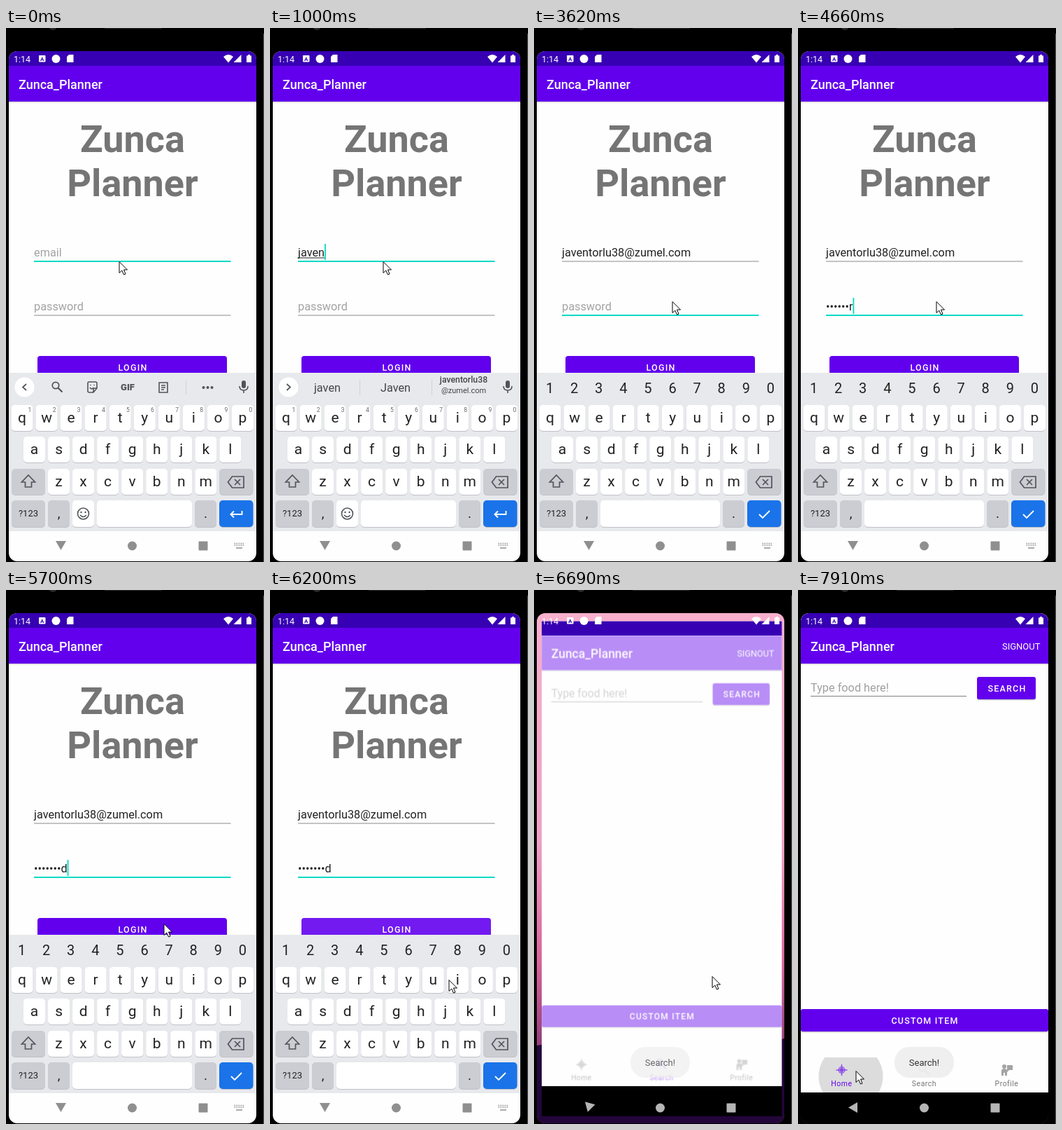
Animation of 369x762 px, one loop 8000 ms. Source, as an HTML page:

```html
<!DOCTYPE html>
<html lang="en">
<head>
<meta charset="utf-8">
<title>Login demo</title>
<style>
  html, body { margin: 0; width: 100%; height: 100%; overflow: hidden; background: #000; }
  svg { display: block; width: 369px; height: 762px; font-family: Roboto, sans-serif; white-space: pre; }
</style>
</head>
<body>
<svg viewBox="0 0 369 762"></svg>
<script>
const LOOP = 8000;
const PURPLE = '#6200ee', DARK_PURPLE = '#3700b3', TEAL = '#03dac5', INK = '#222', ICON = '#50545a';
const APP = ['Zunca', 'Planner'], NAME = 'javen', USER = 'javentorlu38', DOMAIN = '@zumel.com';
const PASSWORD = 'backyard', FIELD_SIZE = 16.3;

const svg = document.querySelector('svg');
const measure = document.createElement('canvas').getContext('2d');
const textWidth = s => {
  measure.font = `${FIELD_SIZE}px Roboto, sans-serif`;
  return measure.measureText(s).width;
};

// Drawing helpers, each returning SVG markup
const rect = (x, y, w, h, fill, r = 0, more = '') =>
  `<rect x="${x}" y="${y}" width="${w}" height="${h}" rx="${r}" fill="${fill}" ${more}/>`;
const circle = (x, y, r, fill, more = '') => `<circle cx="${x}" cy="${y}" r="${r}" fill="${fill}" ${more}/>`;
const fillPath = (d, fill, more = '') => `<path d="${d}" fill="${fill}" ${more}/>`;
const line = (d, color = ICON, width = 1.7, more = '') =>
  `<path d="${d}" fill="none" stroke="${color}" stroke-width="${width}" ${more}/>`;
const text = (x, y, size, s, fill = INK, anchor = 'middle', weight = 400, more = '') =>
  `<text x="${x}" y="${y}" font-size="${size}" fill="${fill}" text-anchor="${anchor}" font-weight="${weight}" ${more}>${s}</text>`;
const group = (more, body) => `<g ${more}>${body}</g>`;
const place = (x, y, scale) => `transform="translate(${x} ${y}) scale(${scale})"`;
const label = (x, y, s) => text(x, y, 12.5, s, '#fff', 'middle', 500, 'letter-spacing="1.2"');
const magnifier = (x, y, color) =>
  circle(x - 2, y - 2, 4.7, 'none', `stroke="${color}" stroke-width="1.8"`) + line(`M${x + 1.5} ${y + 1.5}l6 6`, color, 2.2);

// Value of the latest step [time, ...values] that has started
const stepAt = (steps, t) => steps.filter(s => s[0] <= t).pop().slice(1);

const POINTER = [[0, 162, 333], [1560, 182, 303], [1690, 226, 370], [1810, 270, 455], [1930, 297, 529],
  [2200, 293, 526], [2350, 288, 518], [2590, 262, 470], [2710, 224, 418], [2850, 200, 393], [2970, 198, 390],
  [5310, 224, 450], [5460, 230, 470], [5700, 226, 476], [5960, 229, 482], [6080, 246, 525], [6200, 256, 556],
  [6570, 256, 554], [6690, 255, 551], [6840, 248, 540], [6960, 230, 515], [7100, 206, 465], [7250, 178, 409],
  [7370, 130, 480], [7490, 92, 620], [7610, 83, 686]];
const NAME_TYPED = [[0, 0], [150, 1], [520, 2], [640, 3], [880, 4], [1000, 5]];
const PASSWORD_TYPED = [[0, 0], [3740, 1], [3860, 2], [4120, 3], [4270, 4], [4390, 5], [4510, 6], [4660, 7], [4780, 8]];
const CARET = [[0, 0], [150, 1], [1560, 0], [2080, 1], [3620, 0], [3740, 1], [5310, 0], [5700, 1], [6200, 0]];
const RIPPLE = [[0, 0, 0], [5820, 70, .22], [5960, 170, .22], [6080, 280, .2], [6200, 280, .1]];
// x, y, scale of the entering card, opacity of its content and of the toast, turn of the back key
const ENTER = [[0, 0, 0, 1, 0, 0, 0], [6450, 141, 13, .963, 0, 0, 0], [6570, 38, 13, .965, .12, .3, 3],
  [6690, 7.2, 12.6, .97, .446, .75, 15], [6840, 1.2, 2.5, .994, .85, 1, 65], [6960, 0, 0, 1, 1, 1, 90]];

const appHeader = () => rect(4, 54, 354, 51, PURPLE) + rect(4, 105, 354, 1.5, '#000', 0, 'opacity=".15"')
  + text(18, 87, 18, APP.join('_'), '#fff', 'start', 500);

function field(y, content, hint, focused, caret, underline) {
  const shown = content || hint;
  let out = text(40, y - 7, FIELD_SIZE, shown, content ? INK : '#a3a3a3', 'start');
  out += focused ? rect(40, y - 1, 281.5, 2, TEAL) : rect(40, y - .5, 281.5, 1, '#8c8c8c');
  const end = 40 + textWidth(content);
  if (underline) out += rect(40, y - 5.5, end - 40, 1, INK);
  if (caret) out += rect(end, y - 25, 1.8, 23, TEAL);
  return out;
}

function key(x, y, w, glyph = '', fill = '#fff', size = 21, h = 37) {
  return rect(x, y + 1, w, h, '#bfc1c6', 5) + rect(x, y, w, h, fill, 5)
    + text(x + w / 2, y + h / 2 + size * .33, size, glyph);
}

function tools() {
  return circle(26.5, 512.5, 14, '#fff') + line('M29 508l-5 4.500 5 4.500') + magnifier(73, 512, ICON)
    + line('M117 507q0-2 2-2h9q2 0 2 2v7l-5 6h-6q-2 0-2-2zM130 514h-5v6M120 513q3 4 5 0M121 509v1M126 509v1', ICON, 1.6)
    + text(174, 517, 13, 'GIF', ICON, 'middle', 900)
    + line('M219 506h12v14h-12zM222 506h6M222 510h6M222 513h6M222 516h4', ICON, 1.6)
    + rect(257, 503, 1, 20, '#cfd1d5') + [282.5, 288.5, 294.5].map(x => circle(x, 513, 2, ICON)).join('');
}

function suggestions(typed) {
  return circle(26.5, 512.5, 14, '#fff') + line('M24 508l5 4.500-5 4.500')
    + text(82, 519, FIELD_SIZE, typed, '#444') + text(179.5, 519, FIELD_SIZE, typed[0].toUpperCase() + typed.slice(1), '#444')
    + rect(128, 502, 1, 22, '#cfd1d5') + rect(231, 502, 1, 22, '#cfd1d5')
    + text(277, 506, 12.3, USER, '#444', 'middle', 500) + text(277, 521, 11, DOMAIN, '#444');
}

function keyboard(secret, strip) {
  const gray = '#cbcdd3';
  const row = (letters, x, y) => [...letters].map((c, i) => key(x + i * 35.05, y, 31, c)).join('');
  const digits = [...'1234567890'].map((d, i) => secret
    ? text(22.5 + i * 35.1, 521, 20, d) : text(34 + i * 35.1, 548, 8.5, d, '#666')).join('');
  const mic = rect(337, 503, 6, 11, ICON, 3) + line('M334 511q0 6 6 6t6-6M340 517v4', ICON, 1.6);
  const emoji = circle(110.500, 693, 8, 'none', `stroke="${ICON}" stroke-width="1.600"`)
    + circle(107.500, 691, 1.2, ICON) + circle(113.500, 691, 1.2, ICON) + line('M106 695q4.500 5 9 0', ICON, 1.5);
  return rect(4, 492, 354, 226, '#e8e9ed') + (secret ? '' : strip + mic)
    + row('qwertyuiop', 7.5, 538) + digits + row('asdfghjkl', 25, 583) + row('zxcvbnm', 60, 629)
    + key(8, 629, 48, '', gray) + line('M32 638l9.500 10h-5v7h-9v-7h-5z')
    + key(305, 629, 48.5, '', gray) + line('M317.500 648l6-8h16.500v16h-16.500zM327 644l8 8M335 644l-8 8')
    + key(8, 674, 48, '?123', gray, 13, 38) + key(60, 674, 31, ',', gray, 19, 38)
    + (secret ? key(95, 674, 171, '', '#fff', 9, 38) : key(95, 674, 31, '', '#fff', 9, 38) + emoji + key(130, 674, 136, '', '#fff', 9, 38))
    + key(270, 674, 31, '.', gray, 19, 38) + key(305, 674, 48.5, '', '#1a73e8', 9, 38)
    + line(secret ? 'M322 694l5 5 10-10' : 'M337.500 689v5h-16M326 689.500l-4.500 4.500 4.500 4.500', '#fff', 1.9);
}

function loginScreen(t) {
  const [letters] = stepAt(NAME_TYPED, t), [secretLetters] = stepAt(PASSWORD_TYPED, t);
  const [caret] = stepAt(CARET, t), [radius, glow] = stepAt(RIPPLE, t);
  const filled = t >= 2470, secret = t >= 2970;
  const typed = NAME.slice(0, letters);
  const masked = secretLetters ? '•'.repeat(secretLetters - 1) + PASSWORD[secretLetters - 1] : '';
  return rect(4, 33, 354, 728, '#fefefe') + rect(4, 33, 354, 21, DARK_PURPLE) + appHeader()
    + APP.map((word, i) => text(181, 177 + i * 63, 54, word, '#757575', 'middle', 700)).join('')
    + field(333, filled ? USER + DOMAIN : typed, 'email', !secret, caret && !secret, typed && !filled)
    + field(410, masked, 'password', secret, caret && secret)
    + rect(45, 468, 271, 33, PURPLE, 4)
    + group('clip-path="url(#loginClip)"', circle(229, 484, radius, '#fff', `opacity="${glow}"`))
    + label(181.5, 489, 'LOGIN')
    + keyboard(secret, t >= 400 && !filled ? suggestions(typed) : tools());
}

function tabs(homeSelected) {
  const color = on => on ? PURPLE : '#757575';
  const name = (x, s, on) => text(x, 708, 10.5, s, color(on), 'middle', 400, 'letter-spacing=".5"');
  const home = color(homeSelected);
  return (homeSelected ? group('clip-path="url(#tabClip)"', circle(75.5, 694, 46, '#dcdcdc')) : '')
    + group('opacity=".65"',
      circle(62.5, 685, 5, home) + circle(62.5, 685, 3.5, 'none', 'stroke="#ddd" stroke-width=".8"')
      + line('M62.500 677v16M54.500 685h16', home, 1.5)
      + magnifier(180, 684, color(!homeSelected))
      + circle(295, 680, 3, '#757575') + fillPath('M291 693v-7q0-3 4-3t4 3v7h-3v-4h-2v4zM299 678h8v7h-5l-3 3z', '#757575'))
    + name(62.5, 'Home', homeSelected) + name(180.5, 'Search', !homeSelected) + name(298.5, 'Profile', false);
}

function homeScreen(t, opacity) {
  const raised = (x, y, w, h) => rect(x, y + 1.5, w, h, '#000', 3, 'opacity=".2"') + rect(x, y, w, h, PURPLE, 3);
  return rect(4, 33, 354, 684, '#fefefe') + rect(4, 33, 354, 21, DARK_PURPLE) + rect(4, 717, 354, 44, '#000')
    + group(`opacity="${opacity}"`, appHeader() + text(346.5, 85, 13, 'SIGNOUT', '#fff', 'end')
      + text(18, 145, FIELD_SIZE, 'Type food here!', '#a0a0a0', 'start') + rect(18, 151, 223, 1, '#808080')
      + raised(256, 124, 84, 32) + label(299, 145, 'SEARCH')
      + raised(4, 598, 354, 32) + label(181.5, 619, 'CUSTOM ITEM') + tabs(t >= 7910));
}

const wallpaper = () => rect(4, 33, 354, 728, 'url(#sky)')
  + fillPath('M4 650L60 640 128 632 145 638 250 660 358 640V761H4z', '#22063a');

const statusIcons = () => text(11, 48.5, 12.5, '1:14', '#fff', 'start')
  + rect(47, 39, 9.5, 9.5, '#fff', 1) + text(51.8, 46.8, 8, 'A', DARK_PURPLE, 'middle', 700)
  + circle(71.5, 44, 6, '#fff') + fillPath('M90 38h6.500v11h-9.500v-8z', '#fff')
  + fillPath('M311 41q7-6 14 0l-7 8.500zM336.500 38v11h-11z', '#fff')
  + fillPath('M344 39.500h2v-1.500h3v1.500h2v9.500h-7z', '#fff');

function navIcons(t, turn) {
  const color = t < 6450 ? '#8f8f8f' : t < 6570 ? '#757575' : '#b5b5b5';
  const dots = [735.5, 738].map(y => line(`M326.500 ${y}h14`, color, 1.5, 'stroke-dasharray="1.600 1.400"')).join('');
  return fillPath('M71 732h15l-7.500 13z', color, `transform="rotate(${turn} 78.500 738.500)"`)
    + circle(180.5, 739, 6.5, color) + rect(275.5, 732.5, 13, 13, color, 1)
    + (t < 6570 ? dots + line('M329 742h9', color, 1.5) : '');
}

const defs = `<defs>
  <clipPath id="screenClip">${rect(4, 33, 354, 728, '#000', 12)}</clipPath>
  <clipPath id="loginClip">${rect(45, 468, 271, 33, '#000', 4)}</clipPath>
  <clipPath id="tabClip">${rect(4, 667, 354, 50, '#000')}</clipPath>
  <linearGradient id="sky" x2="0" y2="1"><stop stop-color="#f8b0cd"/><stop offset=".45" stop-color="#f0a0c4"/>
    <stop offset=".68" stop-color="#d8659a"/><stop offset=".84" stop-color="#963f7c"/></linearGradient></defs>`;

function scene(t) {
  const [x, y, scale, opacity, toast, turn] = stepAt(ENTER, t);
  const [px, py] = stepAt(POINTER, t);
  const moving = t >= 6450;
  const cards = moving
    ? wallpaper() + group(place(x - 358, y, scale), loginScreen(t)) + group(place(x, y, scale), homeScreen(t, opacity))
    : loginScreen(t);
  return defs + rect(0, 0, 369, 762, '#000') + rect(368, 8, 1, 754, '#555')
    + circle(67, -3, 6, '#2a2a2a') + rect(140, -5, 84, 6, '#2a2a2a', 3)
    + group('clip-path="url(#screenClip)"', cards + statusIcons() + navIcons(t, turn))
    + group(`opacity="${toast}"`, rect(138, 652, 85, 44, '#eee', 21, 'opacity=".94"') + text(180.5, 679, 13, 'Search!', '#333'))
    + fillPath('M0 .5V16.500L3.800 13 6.500 19 9 18 6.500 12H11.500z', '#fff',
      `stroke="#000" transform="translate(${px} ${py})"`);
}

let shown = '';
function tick() {
  const next = scene(performance.now() % LOOP);
  if (next !== shown) svg.innerHTML = shown = next;
  requestAnimationFrame(tick);
}
tick();
</script>
</body>
</html>
```
